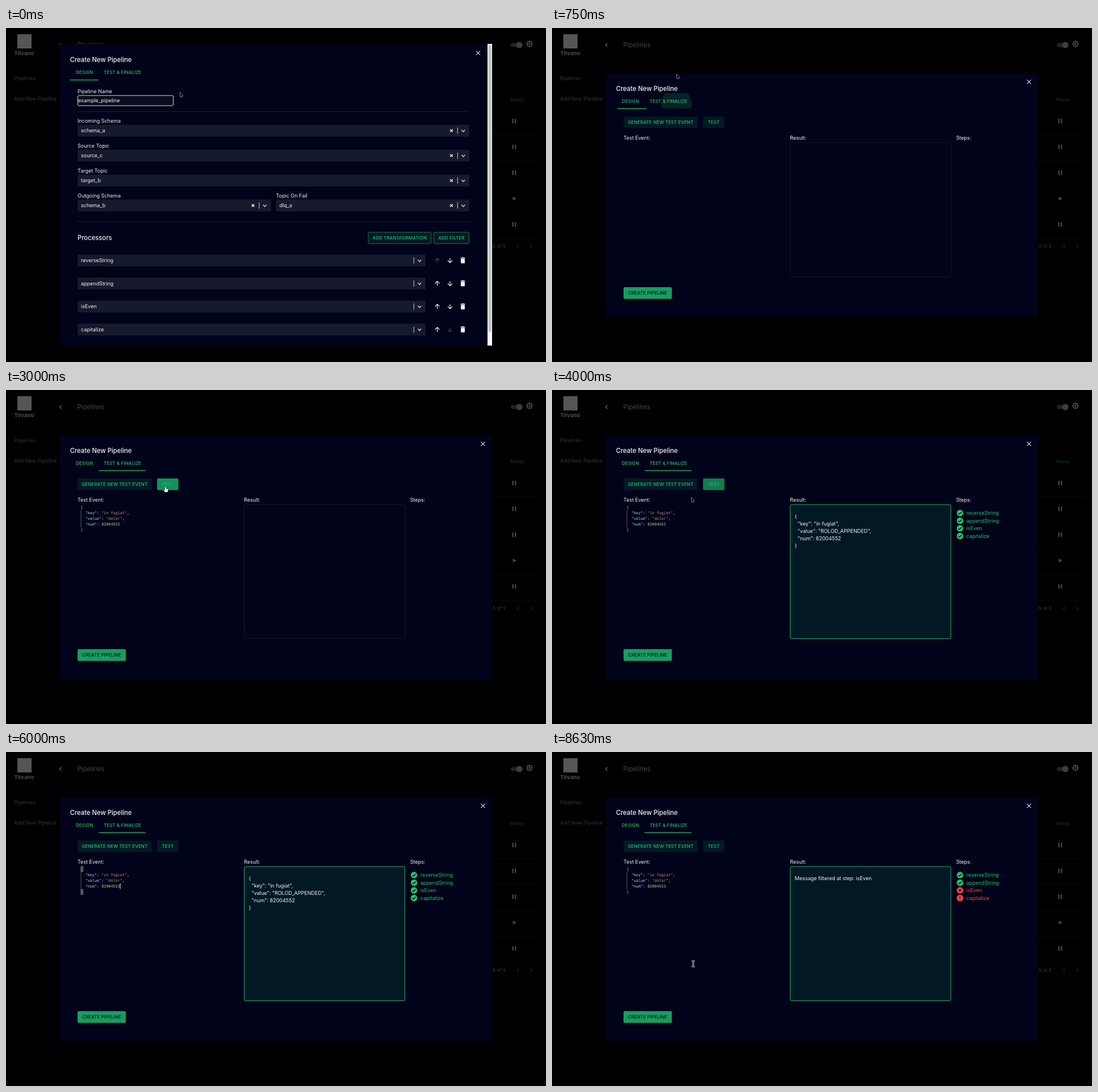
An HTML page with a canvas that plays this animation: 951 px wide and 589 px high, repeating every 8.75 s.

```html
<!DOCTYPE html>
<html lang="en">
<head>
<meta charset="utf-8">
<title>Pipeline editor</title>
<style>
html, body { margin: 0; height: 100%; overflow: hidden; background: #000; }
canvas { display: block; }
</style>
</head>
<body>
<canvas id="stage" width="951" height="589"></canvas>
<script>
const ctx = document.getElementById('stage').getContext('2d');
const LOOP = 8750, STEP = 125;
const SANS = 'Inter, sans-serif', MONO = '"DejaVu Sans Mono", monospace';
const NAVY = '#000319', PANEL = '#161a2d', TINT = '#031825', GREEN = '#22c46f', RED = '#ff4639', WHITE = '#f2f3f5';

const clamp = v => Math.max(0, Math.min(1, v));
const ramp = (t, a, b) => clamp((t - a) / (b - a));
const smooth = v => v * v * (3 - 2 * v);
const mix = (a, b, k) => a + (b - a) * k;
const rgbMix = (a, b, k) => `rgb(${a.map((v, i) => Math.round(mix(v, b[i], k)))})`;
const inside = (p, x, y, w, h) => p.x >= x && p.x < x + w && p.y >= y && p.y < y + h;

// y is the middle of the capital letters
function text(s, x, y, color = WHITE, { size = 9, weight = 400, family = SANS, align = 'left', track = 0 } = {}) {
  ctx.font = `${weight} ${size}px ${family}`;
  ctx.letterSpacing = track + 'px';
  ctx.textAlign = align;
  ctx.fillStyle = color;
  ctx.fillText(s, x, y + size * 0.364);
}

const caps = (s, x, y, color = GREEN, align = 'left') =>
  text(s, x, y, color, { size: 7.875, weight: 500, align, track: 0.15 });

function box(x, y, w, h, fill, border, r = 0) {
  ctx.beginPath();
  ctx.roundRect(x, y, w, h, r);
  if (fill) { ctx.fillStyle = fill; ctx.fill(); }
  if (border) { ctx.strokeStyle = border; ctx.lineWidth = 1; ctx.stroke(); }
}

function line(points, color, width = 1, close = false) {
  ctx.beginPath();
  for (let i = 0; i < points.length; i += 2) ctx.lineTo(points[i], points[i + 1]);
  if (close) ctx.closePath();
  ctx.strokeStyle = color;
  ctx.lineWidth = width;
  ctx.stroke();
}

function disc(x, y, r, color) {
  ctx.beginPath();
  ctx.arc(x, y, r, 0, 7);
  ctx.fillStyle = color;
  ctx.fill();
}

function cross(x, y, r, color, width) {
  line([x - r, y - r, x + r, y + r], color, width);
  line([x - r, y + r, x + r, y - r], color, width);
}

const chevron = (x, y, dx, dy, color, width = 1.3) =>
  line(dx ? [x - dx, y - dy, x + dx, y, x - dx, y + dy] : [x - 3, y - dy, x, y + dy, x + 3, y - dy], color, width);

function button(label, x, y, w, h, k = 0) {
  box(x, y, w, h, rgbMix([3, 25, 37], [23, 143, 88], k), null, 2);
  caps(label, x + w / 2, y + h / 2, rgbMix([34, 196, 111], [34, 180, 106], k), 'center');
}

function backdrop() {
  box(0, 0, 951, 589, '#000002');
  box(20, 11, 25, 25, '#555');
  text('Tilvano', 32, 45, '#4a4a4a', { size: 9.6, weight: 700, align: 'center' });
  chevron(96, 30, -1.6, 3.2, '#666', 1.2);
  text('Pipelines', 125.5, 30, '#444', { size: 11.25 });
  text('Pipelines', 14, 88.5, '#333');
  text('Add New Pipeline', 14, 125, '#333');
  box(889, 26.5, 19, 7, '#222', null, 3.5);
  disc(904, 30, 5.5, '#3d3d3d');
  for (let a = 0; a < 8; a++) {
    const c = Math.cos(a * Math.PI / 4), s = Math.sin(a * Math.PI / 4);
    line([922 + c * 4, 28 + s * 4, 922 + c * 5.8, 28 + s * 5.8], '#555', 2);
  }
  ctx.beginPath(); ctx.arc(922, 28, 4, 0, 7); ctx.lineWidth = 1.3; ctx.stroke();
  disc(922, 28, 1.7, '#555');
  text('Pause', 900, 126.5, '#07331d', { size: 7.9, weight: 600, align: 'center' });
  for (let i = 0; i < 5; i++) {
    const y = 164 + i * 45.6;
    line([856, y + 24.5, 938, y + 24.5], '#0b0b0d');
    if (i === 3) {
      ctx.beginPath(); ctx.moveTo(892.5, y - 3.5); ctx.lineTo(899, y); ctx.lineTo(892.5, y + 3.5);
      ctx.fillStyle = '#444'; ctx.fill();
    } else {
      box(891.5, y - 4, 2.4, 8, '#444');
      box(896, y - 4, 2.4, 8, '#444');
    }
  }
  text('1–5 of 5', 880, 385.5, '#3a3a3a', { size: 7.9, align: 'right', track: 0.2 });
  chevron(902, 385.5, -1.5, 3, '#222', 1.1);
  chevron(925, 385.5, 1.5, 3, '#222', 1.1);
}

function heading(y, closeX) {
  text('Create New Pipeline', 112.7, y + 27.5, WHITE, { size: 11.25, weight: 500 });
  cross(closeX, y + 16, 3.6, '#d5d6da', 1.2);
  caps('DESIGN', 123, y + 50);
  caps('TEST & FINALIZE', 172, y + 50);
}

function ripple(t, y) {
  const r = mix(0, 27, ramp(t, 560, 750)) + 45 * ramp(t, 750, 1000);
  const alpha = 0.17 * (1 - ramp(t, 800, 1200));
  if (!r || !alpha) return;
  ctx.save();
  ctx.beginPath(); ctx.rect(163, y + 35, 82.5, 27.5); ctx.clip();
  disc(219, y + 54, r, `rgba(34,196,111,${alpha})`);
  ctx.restore();
}

function select(value, x, y, w, clearable = true) {
  box(x, y - 10.5, w, 21, PANEL, null, 2);
  text(value, x + 6, y);
  const right = x + w;
  if (clearable) cross(right - 31.5, y, 2.3, WHITE, 1.5);
  line([right - 20.7, y - 5.5, right - 20.7, y + 5.5], '#cfd0d4');
  chevron(right - 10.7, y + 0.3, 0, 1.6, '#cfd0d4', 1.4);
}

function field(label, value, x, y, w) {
  text(label, x, y - 17.7);
  select(value, x, y, w);
}

function arrow(x, y, dir, color) {
  line([x, y - 4, x, y + 4], color, 1.2);
  line([x - 4, y, x, y + 4 * dir, x + 4, y], color, 1.2);
}

function trash(x, y) {
  box(x - 4, y - 5, 8, 1.4, WHITE);
  box(x - 1.5, y - 5.6, 3, 1, WHITE);
  box(x - 3.5, y - 3, 7, 8, WHITE, null, 1);
}

function designPage(t) {
  box(95, 28, 761, 532, NAVY);
  box(848, 28, 8, 532, '#fafafa');
  box(849.5, 30, 5, 506, '#c1c1c1', null, 2.5);
  heading(28, 831.5);
  ripple(t, 28);
  box(112.7, 91, 50.3, 1.2, GREEN);
  text('Pipeline Name', 126, 112);
  box(126.5, 119, 168, 18, '#0a0d20', '#d8d9dc', 2);
  text('example_pipeline', 127, 128);
  line([126, 147.5, 816, 147.5], '#1d2132');
  field('Incoming Schema', 'schema_a', 126, 181, 690);
  field('Source Topic', 'source_c', 126, 225, 690);
  field('Target Topic', 'target_b', 126, 269, 690);
  field('Outgoing Schema', 'schema_b', 126, 313, 340.5);
  field('Topic On Fail', 'dlq_a', 475.5, 313, 340.5);
  line([126, 341.5, 816, 341.5], '#1d2132');
  text('Processors', 126, 369.5, WHITE, { size: 11.25, weight: 500 });
  for (const [label, x, w] of [['ADD TRANSFORMATION', 638, 110.5], ['ADD FILTER', 753.5, 62]]) {
    box(x, 360.2, w, 20, TINT, '#167a4b', 2);
    caps(label, x + w / 2, 370.5, GREEN, 'center');
  }
  STEPS.forEach((name, i) => {
    const y = 410 + i * 40.6;
    select(name, 126, y, 613, false);
    arrow(759.5, y, -1, i === 0 ? '#43465a' : WHITE);
    arrow(782, y, 1, i === 3 ? '#43465a' : WHITE);
    trash(804.5, y);
  });
}

const STEPS = ['reverseString', 'appendString', 'isEven', 'capitalize'];
const KEY = '#9cdcfe', STRING = '#ce9178', NUMBER = '#b5cea8', PLAIN = '#d4d4d4', BRACE = '#e0b83a';

function editor(t) {
  const cell = 4.064, left = 131.6, row = i => 206.4 + i * 10.125;
  const number = t < 5500 ? '82004552' : t < 6000 ? '8200455' : '82004553';
  const lines = [
    [['{', BRACE]],
    [['  "key"', KEY], [': ', PLAIN], ['"in fugiat"', STRING], [',', PLAIN]],
    [['  "value"', KEY], [': ', PLAIN], ['"dolor"', STRING], [',', PLAIN]],
    [['  "num"', KEY], [': ', PLAIN], [number, NUMBER]],
    [['}', BRACE]],
  ];
  const focused = t >= 4625 && t < 7375;
  line([132, 211.5, 132, 242], '#55585f');
  lines.forEach((parts, i) => {
    if (focused && parts.length === 1) box(132, row(i) - 4.5, 3.6, 9, '#0a2418', '#85868a');
    let col = 0;
    for (const [s, color] of parts) {
      text(s, left + col * cell, row(i), color, { size: 6.75, family: MONO });
      col += s.length;
    }
  });
  const blinkOn = t < 5250 || (t >= 5500 && t < 6500);
  if (focused && blinkOn) box(left + (9 + number.length) * cell, 231.5, 1, 10, '#e8e8e8');
}

function stepMark(kind, x, y) {
  disc(x, y, 5.7, kind === 'ok' ? GREEN : RED);
  if (kind === 'ok') line([x - 2.8, y, x - 0.9, y + 2, x + 3, y - 2], NAVY, 1.3);
  else if (kind === 'no') cross(x, y, 2, NAVY, 1.2);
  else {
    box(x - 0.6, y - 3, 1.2, 3.6, NAVY);
    box(x - 0.6, y + 1.6, 1.2, 1.3, NAVY);
  }
}

function testPage(t) {
  box(95, 79.5, 761, 430, NAVY);
  heading(79, 840);
  ripple(t, 79.5);
  const k = smooth(ramp(t, 720, 950));
  const from = mix(112.7, 163.2, k), to = mix(163, 245.3, k);
  box(from, 141.6, to - from, 1.2, GREEN);

  const hoverGen = ramp(t, 1300, 1500) - ramp(t, 2400, 2700);
  const hoverTest = ramp(t, 2500, 2750) - ramp(t, 3950, 4250) + ramp(t, 6800, 7000) - ramp(t, 8200, 8500);
  button('GENERATE NEW TEST EVENT', 126, 156, 130.7, 20.5, hoverGen);
  button('TEST', 266, 156, 37.7, 20.5, hoverTest);
  text('Test Event:', 126, 193.5);
  text('Result:', 419, 193.5);
  text('Steps:', 711.7, 193.5);
  if (t >= 2125) editor(t);

  const shown = ramp(t, 3000, 3375);
  box(419.5, 202, 283, 236.5, rgbMix([0, 3, 25], [3, 24, 37], shown), rgbMix([18, 24, 43], [31, 169, 104], shown), 2);
  if (t >= 3125) {
    const filtered = t >= 7500;
    const result = filtered ? ['Message filtered at step: isEven']
      : ['{', '  "key": "in fugiat",', '  "value": "ROLOD_APPENDED",', '  "num": 82004552', '}'];
    result.forEach((s, i) => text(s, 427.5, 223.2 + i * 12.9));
    STEPS.forEach((name, i) => {
      const kind = !filtered || i < 2 ? 'ok' : i === 2 ? 'no' : 'skip', y = 217 + i * 13.5;
      stepMark(kind, 718.5, y);
      text(name, 729.7, y, kind === 'ok' ? GREEN : RED);
    });
  }
  box(126, 457, 85, 20.7, '#189c60', null, 2);
  caps('CREATE PIPELINE', 168.5, 467.5, '#03140f', 'center');
}

// time, x, y of the pointer tip
const PATH = [[0, 306, 113], [375, 219, 81], [875, 219, 81], [1500, 200, 165], [2250, 200, 165], [2750, 281, 171],
  [3625, 281, 171], [4000, 245, 189], [4500, 227.5, 235], [6375, 227.5, 235], [7000, 281, 171], [8125, 281, 171], [8625, 248.7, 373.5]];

function pointerAt(t) {
  const i = Math.max(1, PATH.findIndex(p => p[0] >= t));
  const [a, b] = t > 8625 ? [PATH.at(-1), PATH.at(-1)] : [PATH[i - 1], PATH[i]];
  const k = smooth(ramp(t, a[0], b[0] + (a === b)));
  return { x: mix(a[1], b[1], k), y: mix(a[2], b[2], k) };
}

function polygon(points, fill, border) {
  line(points, border, 1, true);
  ctx.fillStyle = fill;
  ctx.fill();
}

function pointer(t, design) {
  if (t >= 5500 && t < 6500) return;
  const p = pointerAt(t);
  const overButton = design ? inside(p, 163, 65, 83, 27)
    : inside(p, 113, 115, 133, 28) || inside(p, 126, 156, 131, 21) || inside(p, 266, 156, 38, 21);
  ctx.save();
  ctx.translate(p.x, p.y);
  if (overButton) {
    polygon([-1, 0, 0.5, 0, 1, 3, 4.5, 4, 4.5, 6.5, 3.3, 9, -1, 9, -3.5, 5.5, -2.7, 4.7, -1, 6], '#fff', '#222');
    line([1.2, 5.5, 1.2, 7.5], '#444', 0.6);
  } else if (!design && inside(p, 126, 203, 284, 240)) {
    for (const [color, w] of [['#ddd', 2.6], ['#111', 1]]) {
      line([0, -5, 0, 5], color, w);
      line([-2.5, -5.2, 0, -4.2, 2.5, -5.2], color, w);
      line([-2.5, 5.2, 0, 4.2, 2.5, 5.2], color, w);
    }
  } else {
    polygon([0.5, 0.5, 0.5, 8, 2.2, 6.5, 3.4, 9.2, 4.6, 8.6, 3.5, 6, 5.6, 5.8], '#000', '#e6e6e6');
  }
  ctx.restore();
}

function draw(now) {
  const t = Math.floor((now % LOOP) / STEP) * STEP;
  const design = t < 750;
  backdrop();
  (design ? designPage : testPage)(t);
  pointer(t, design);
  requestAnimationFrame(draw);
}
requestAnimationFrame(draw);
</script>
</body>
</html>
```
